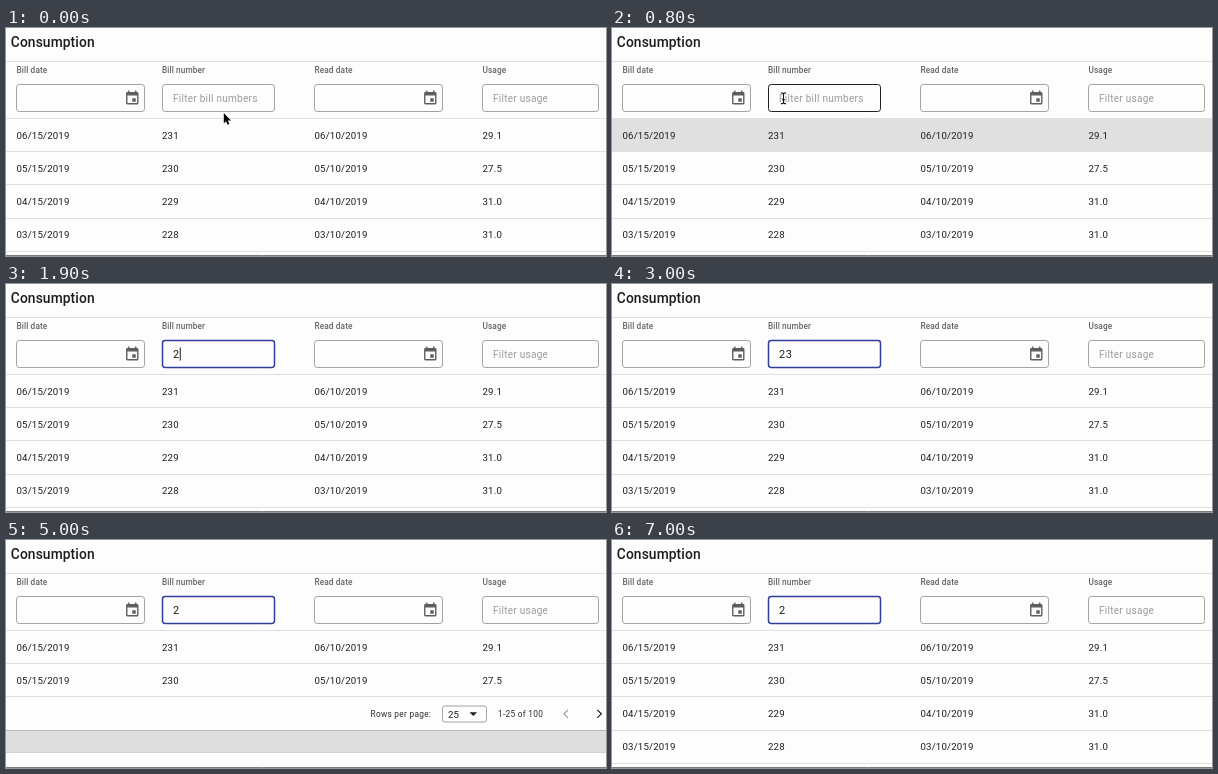
These frames come from a looping animation (600x228 px, 7.4 s). An HTML page:

```html
<!DOCTYPE html>
<html lang="en">
<head>
<meta charset="utf-8">
<title>Consumption table</title>
<style>
html, body { margin: 0; width: 100%; height: 100%; overflow: hidden; background: #fdfdfe; }
svg { display: block; width: 600px; height: 228px; font-family: Roboto, Arial, sans-serif; }
text { white-space: pre; }
.title { font-size: 13.8px; font-weight: 500; letter-spacing: .1px; fill: #1c1c1c; }
.head { font-size: 8.28px; font-weight: 500; letter-spacing: .1px; fill: #666; }
.cell { font-size: 9.66px; letter-spacing: .16px; fill: #1c1c1c; }
.hint { font-size: 10px; letter-spacing: .27px; fill: #9c9c9c; }
.value { font-size: 11px; letter-spacing: .5px; fill: #1c1c1c; }
.small { font-size: 8.3px; letter-spacing: .29px; fill: #2c2c2c; }
.field { fill: none; stroke: #a2a2a2; stroke-width: 1; }
.line { stroke: #dfdfe0; stroke-width: 1; }
.icon { fill: #5e5e5e; }
.chevron { fill: none; stroke-width: 1.2; }
</style>
</head>
<body>
<svg viewBox="0 0 600 228">
  <rect width="600" height="228" fill="#fdfdfe"/>
  <rect id="hover" y="91" width="600" height="32" fill="#e0e0e0"/>
  <g id="table"></g>
  <g id="more"></g>
  <g id="footer">
    <text class="small" x="364.5" y="177">Rows per page:</text>
    <rect class="field" x="436.5" y="166" width="44" height="16" rx="2.5"/>
    <text class="cell" x="442" y="177.5">25</text>
    <path d="M463.5 172.3h7.6l-3.8 3.8z" fill="#1c1c1c"/>
    <text class="small" x="492" y="177">1-25 of 100</text>
    <path class="chevron" d="M562 169.8l-4 4 4 4" stroke="#9a9a9a"/>
    <path class="chevron" d="M591.3 169.8l4 4-4 4" stroke="#1c1c1c"/>
    <rect y="190" width="600" height="23" fill="#dededf"/>
    <path d="M0 190.5H600" stroke="#b9b9ba"/>
    <path d="M0 212.5H600" stroke="#d2d2d3"/>
  </g>
  <path d="M0 227.5H600" stroke="#7b7b7b"/>
  <rect id="filter" class="field" x="156.5" y="56.5" width="112" height="27" rx="2.7"/>
  <text id="hint" class="hint" x="167" y="73.8">Filter bill numbers</text>
  <text id="value" class="value" x="167" y="74"></text>
  <rect id="caret" y="63.5" width="1" height="13" fill="#1c1c1c"/>
  <path id="arrow" d="M0 0v10.3l2.3-2.1 1.6 3.6 1.7-.7-1.6-3.5h3.2z"
        fill="#000" stroke="#fff" stroke-width="1" paint-order="stroke"/>
  <g id="beam" fill="none">
    <path d="M-2.6-5.5Q0-5.5 0-4V4Q0 5.5-2.6 5.5M2.6-5.5Q0-5.5 0-4V4Q0 5.5 2.6 5.5M-1.5 1.5h3"
          stroke="#fff" stroke-width="2.4"/>
    <path d="M-2.6-5.5Q0-5.5 0-4V4Q0 5.5-2.6 5.5M2.6-5.5Q0-5.5 0-4V4Q0 5.5 2.6 5.5M-1.5 1.5h3"
          stroke="#111" stroke-width="1.1"/>
  </g>
</svg>
<script>
const LOOP = 7400;
const $ = id => document.getElementById(id);
const columns = [10.5, 156, 308.5, 476.5];
const heads = ['Bill date', 'Bill number', 'Read date', 'Usage'];
const usage = ['29.1', '27.5', '31.0', '31.0'];
const calendar = 'M17 12h-5v5h5v-5zM16 1v2H8V1H6v2H5c-1.11 0-1.99.9-1.99 2L3 19c0 1.1.89 2 2 2h14' +
  'c1.1 0 2-.9 2-2V5c0-1.1-.9-2-2-2h-1V1h-2zm3 18H5V8h14v11z';

const label = (cls, x, y, str) => `<text class="${cls}" x="${x}" y="${y}">${str}</text>`;
const line = y => `<path class="line" d="M0 ${y}H600"/>`;
const box = (x, w) => `<rect class="field" x="${x}" y="56.5" width="${w}" height="27" rx="2.7"/>`;
const dateField = x => box(x, 128) +
  `<path class="icon" transform="translate(${x + 107.5} 61.9) scale(.69)" d="${calendar}"/>`;

function row(i) {
  const y = 110.5 + i * 33.3;
  const month = `0${6 - i}`;
  return [`${month}/15/2019`, 231 - i, `${month}/10/2019`, usage[i]]
    .map((str, c) => label('cell', columns[c], y, str)).join('');
}

$('table').innerHTML = label('title', 4.8, 19, 'Consumption') +
  heads.map((str, c) => label('head', columns[c], 45, str)).join('') +
  [33.5, 90.5, 123.5, 156.5].map(line).join('') +
  dateField(10.5) + dateField(308.5) + box(476.5, 116) +
  label('hint', 487, 73.8, 'Filter usage') + row(0) + row(1);
$('more').innerHTML = row(2) + row(3) + line(190.5) + line(223.5);

// Each entry: start time, state
const pointer = [
  [0, ['arrow', 217.8, 85]], [100, ['arrow', 217.4, 84.6]],
  [400, ['arrow', 207, 92]], [500, ['arrow', 191, 97]],
  [600, ['arrow', 178, 97]], [700, ['arrow', 172, 91.5]],
  [800, ['beam', 171.5, 70.3]], [1000, ['beam', 176.5, 68.3]],
  [1200, ['beam', 215, 64]], [1300, ['arrow', 255, 43.5]], [1900, ['none', 0, 0]]
];
const typed = [[0, ''], [1900, '2'], [2500, '23'], [4400, '2']];
const blink = [
  [0, 0], [1000, 1], [1500, 0], [1900, 1], [2400, 0], [2500, 1], [3000, 0], [3500, 1],
  [4000, 0], [4500, 1], [5000, 0], [5500, 1], [6000, 0], [6500, 1], [7000, 0]
];
const outline = [[0, ['#a2a2a2', 1]], [800, ['#212121', 1]], [1000, ['#303f9f', 1.5]]];

const at = (track, t) => track.filter(([start]) => start <= t).pop()[1];
const show = (id, on) => $(id).setAttribute('visibility', on ? 'visible' : 'hidden');

function draw(t) {
  const [kind, x, y] = at(pointer, t);
  for (const id of ['arrow', 'beam']) {
    show(id, id === kind);
    $(id).setAttribute('transform', `translate(${x} ${y})`);
  }
  const str = at(typed, t);
  $('value').textContent = str;
  show('hint', !str);
  show('caret', at(blink, t));
  $('caret').setAttribute('x', 167 + str.length * 6.75);

  const [color, width] = at(outline, t);
  $('filter').style.stroke = color;
  $('filter').style.strokeWidth = width;

  const filtered = t >= 3300 && t < 5200;
  show('footer', filtered);
  show('more', !filtered);
  show('hover', t >= 400 && t < 900);
}

const began = performance.now();
function tick() {
  draw((performance.now() - began) % LOOP);
  requestAnimationFrame(tick);
}
tick();
</script>
</body>
</html>
```
